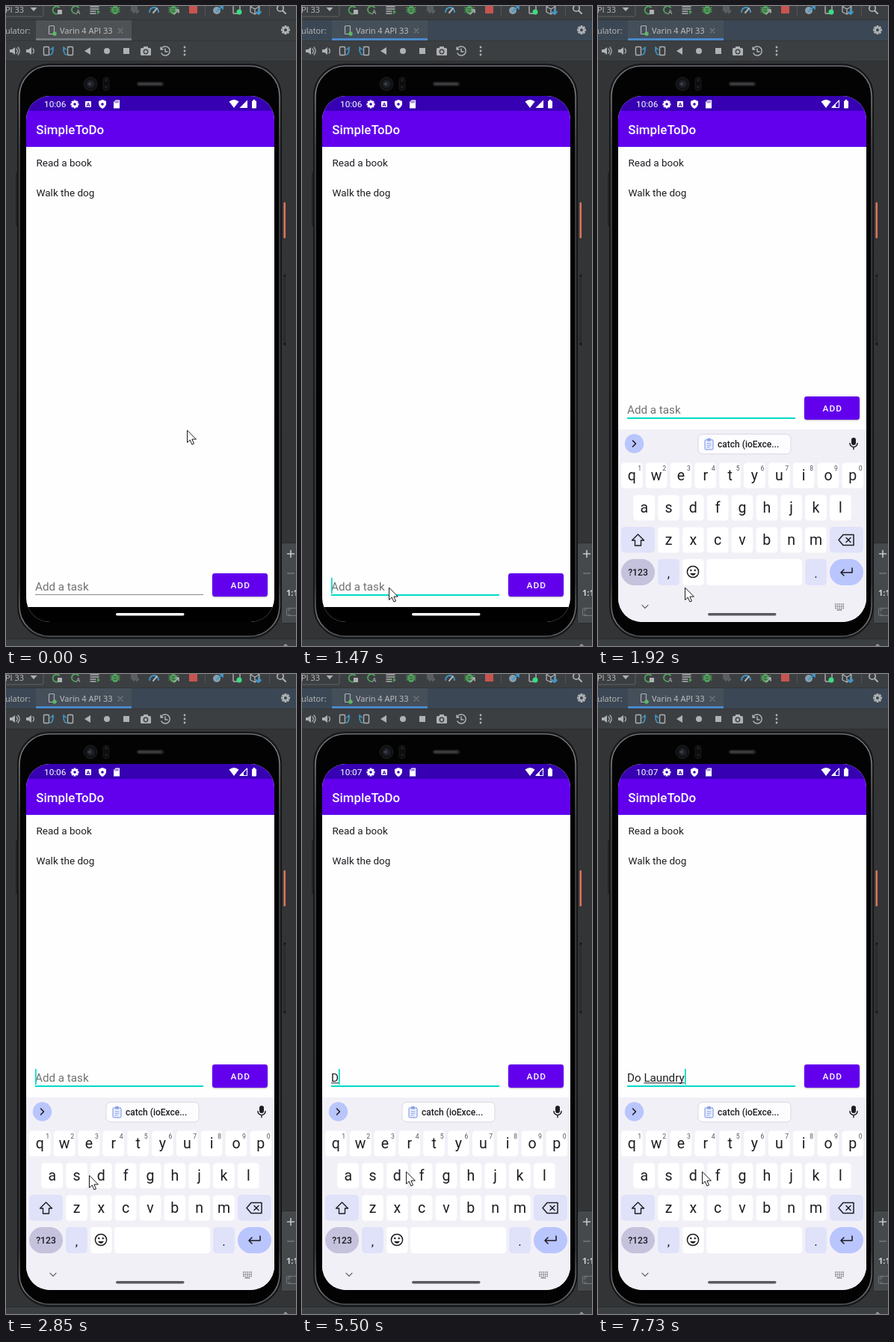
These frames come from a looping animation (388 by 854 pixels, 8 s). An HTML page with a canvas:

```html
<!DOCTYPE html>
<html lang="en">
<head>
<meta charset="utf-8">
<title>To-do app in an emulator</title>
<style>
html, body { margin: 0; width: 100%; height: 100%; overflow: hidden; background: #323436; }
canvas { display: block; width: 388px; height: 854px; }
</style>
</head>
<body>
<canvas id="stage"></canvas>
<script>
const W = 388, H = 854, LOOP = 8000;
const canvas = document.getElementById('stage');
const c = canvas.getContext('2d');
const dpr = window.devicePixelRatio || 1;
canvas.width = W * dpr;
canvas.height = H * dpr;

const UI = '"Open Sans", sans-serif', APP = 'Roboto, sans-serif';
const GREY = '#afb1b3', GREEN = '#4fa35a', BLUE = '#3f97c9', INK = '#1d1d22', TEAL = '#03dac5';

// Held states: [start, ...values]
const pointer = [
  [0, 242, 566], [410, 257, 529], [545, 261, 513], [680, 246, 590], [815, 203, 676],
  [950, 150, 750], [1085, 112, 779], [1220, 116, 776], [2310, 128, 784], [2430, 140, 792],
  [2550, 150, 764], [2700, 128, 700], [2850, 111, 669], [3000, 120, 662], [3130, 132, 661], [3270, 139, 664]
];
const typing = [
  [0, '', ''], [5500, '', 'D'], [5930, '', 'Do'], [6210, 'Do ', ''], [6480, 'Do ', 'L'],
  [6630, 'Do ', 'La'], [6780, 'Do ', 'Lau'], [7060, 'Do ', 'Laun'], [7320, 'Do ', 'Laund'],
  [7450, 'Do ', 'Laundr'], [7730, 'Do ', 'Laundry']
];
const blink = [[0, 0], [1470, 1], [1920, 0], [2430, 1], [3000, 0], [3420, 1], [3950, 0], [4380, 1], [4910, 0], [5500, 1]];
const held = (list, t) => list.filter(s => s[0] <= t).pop().slice(1);

function box(x, y, w, h, fill, r = 0, stroke, lw = 1) {
  c.beginPath();
  c.roundRect(x, y, w, h, r);
  if (fill) { c.fillStyle = fill; c.fill(); }
  if (stroke) { c.strokeStyle = stroke; c.lineWidth = lw; c.stroke(); }
}
function dot(x, y, r, fill, stroke, lw = 1) {
  box(x - r, y - r, 2 * r, 2 * r, fill, r, stroke, lw);
}
function text(s, x, y, size, color, font = APP, weight = 400, align = 'left') {
  c.font = `${weight} ${size}px ${font}`;
  c.textAlign = align;
  c.fillStyle = color;
  c.fillText(s, x, y);
}
function shape(d, x, y, fill, stroke, lw = 1.3) {
  const p = new Path2D(d);
  c.save();
  c.translate(x, y);
  if (fill) { c.fillStyle = fill; c.fill(p); }
  if (stroke) {
    c.strokeStyle = stroke;
    c.lineWidth = lw;
    c.lineCap = c.lineJoin = 'round';
    c.stroke(p);
  }
  c.restore();
}
function gear(x, y, r, color, hole) {
  c.save();
  c.translate(x, y);
  for (let i = 0; i < 4; i++) {
    box(-r * .25, -r, r * .5, 2 * r, color);
    c.rotate(Math.PI / 4);
  }
  c.restore();
  dot(x, y, r * .72, color);
  dot(x, y, r * .33, hole);
}
function bug(x, y) {
  shape('M-6 -3L6 3M-6 3L6 -3M-6 0H6', x, y, null, GREEN, 1.3);
  box(x - 4, y - 5, 8, 11, GREEN, 4);
  shape('M-2 -1H2M-2 2H2', x, y, null, '#3c3f41', 1);
}

function toolbar(focused) {
  const header = focused ? '#3b4754' : '#3c3f41';
  box(0, 0, W, 74, '#3c3f41');
  box(-10, -10, 60, 24, null, 2, '#5f6264');
  text('PI 33', -1, 9, 11, '#bbbbbb', UI);
  shape('M-4.5 -2H4.5L0 3Z', 37, 4, GREY);
  shape('M4 -3A5 5 0 1 0 5 3', 67, 5, null, GREEN, 1.8);
  box(69, 5, 6, 6, GREY);
  shape('M4 -3A5 5 0 1 0 0 5', 93, 5, null, GREEN, 1.8);
  text('A', 94, 11, 8, GREY, UI, 600);
  shape('M-6 -4H5M-6 -1H5M-6 2H1M-6 5H1', 119, 5, null, GREY, 1.5);
  shape('M3 2V8L7 5Z', 119, 3, GREEN);
  bug(146, 5);
  shape('M-5 -5H4V3L-1 7L-5 3ZM2 0L7 4L2 8Z', 172, 3, '#5b5e60');
  shape('M-6 4A6 6 0 0 1 6 4', 198, 4, null, BLUE, 2);
  shape('M-1 5L4 -1', 198, 4, null, GREY, 2);
  bug(224, 5);
  shape('M0 6L6 0M2 0H6V4', 225, 5, null, GREY, 1.5);
  box(245, 0, 11, 10, '#c75450');
  box(266, 0, 1, 13, '#515456');
  dot(282, 6, 5, '#87a0ad');
  shape('M-2 3L6 -4M2 -4H6V0', 284, 4, null, BLUE, 1.8);
  box(304, -6, 9, 16, null, 1, GREY, 1.4);
  dot(312, 8, 3.5, '#3ddc84');
  shape('M-6 -3L0 -6L6 -3V4L0 7L-6 4ZM-6 -3L0 0L6 -3M0 0V7', 333, 4, null, GREY, 1.3);
  shape('M3 1V8M0 5L3 8L6 5', 335, 3, null, BLUE, 2);
  box(352, 0, 1, 13, '#515456');
  dot(367, 3, 4.2, null, GREY, 1.7);
  shape('M3 3L7 7', 367, 3, null, GREY, 2);
  box(0, 18, W, 1, '#323537');

  box(0, 19, W, 27, header);
  box(40, 19, 128, 27, focused ? '#454f5a' : '#4e5254');
  box(40, 43, 128, 3, focused ? '#4a88c7' : '#747a80');
  text('ulator:', -1, 37, 11, '#bbbbbb', UI);
  box(57.5, 26.5, 7, 11, null, 1, GREY, 1.2);
  dot(65, 37, 2.7, '#5fb865');
  text('Varin 4 API 33', 72, 37, 11, '#c4c4c4', UI);
  shape('M-3 -3L3 3M3 -3L-3 3', 153, 33, null, '#777b7e', 1.1);
  gear(374, 32, 6, GREY, header);
  box(0, 46, W, 1, '#323537');

  for (const x of [11, 33]) shape('M-6 -2H-3L1 -5V5L-3 2H-6Z', x, 60, GREY);
  shape('M3 -3A4 4 0 0 1 3 3M5 -5A7 7 0 0 1 5 5', 11, 60, null, GREY, 1.3);
  shape('M3 -3A4 4 0 0 1 3 3', 33, 60, null, GREY, 1.3);
  for (const [x, k] of [[57, 1], [83, -1]]) {
    box(x - 3.5 - 3 * k, 54.5, 7, 11, null, 1, GREY, 1.4);
    shape(`M${2 * k} 5Q${6 * k} 5 ${6 * k} -4M${3 * k} -2L${6 * k} -5`, x, 60, null, BLUE, 1.7);
  }
  shape('M4 -5V5L-4 0Z', 109, 60, GREY);
  dot(135, 60, 4, GREY);
  box(157, 56, 8, 8, GREY);
  box(180, 56, 14, 10, GREY, 1.5);
  box(184, 54, 6, 3, GREY);
  dot(187, 61, 2.7, null, '#3c3f41', 1.4);
  shape('M-5 -3A6 6 0 1 1 -5 3M-6 -5V-2H-3M0 -3V1H3', 213, 60, null, GREY, 1.5);
  for (const y of [55, 60, 65]) dot(239, y, 1.4, GREY);
  box(0, 73, W, 1, '#2b2d2f');
}

function surround() {
  box(0, 0, W, H, '#323436');
  box(0, 845, W, 9, '#3c3f41');
  box(0, 844, W, 1, '#292b2d');
  shape('M-3 3L0 0L3 3', 374, 852, null, GREY);
  box(368.5, 716.5, 30, 107, '#45494c', 2, '#2a2c2e');
  shape('M-4.5 0H4.5M0 -4.5V4.5', 381, 731, null, '#c3c5c7', 1.6);
  shape('M-4.5 0H4.5', 381, 757, null, '#75787a', 1.3);
  text('1:1', 375, 787, 11, '#d0d2d4', UI, 700);
  box(375.5, 803.5, 14, 10, null, 1, '#75787a');
  shape('M0 3V0H3M0 6V8H3', 378, 805, null, '#75787a', 1);
}

function phone() {
  box(13, 222, 3, 72, '#222426', 1);
  box(371.5, 262, 2.5, 48, '#e0745c', 1);
  box(371, 358, 3, 95, '#292b2d', 1);
  dot(373, 360, 1.3, '#111');
  dot(373, 451, 1.3, '#111');

  // Metal edge, brightest round the corners
  const shine = c.createLinearGradient(0, 78, 0, 843);
  shine.addColorStop(0, '#6a6d70');
  shine.addColorStop(.05, '#85888a');
  shine.addColorStop(.15, '#4a4d50');
  shine.addColorStop(.9, '#3c3f42');
  shine.addColorStop(.97, '#7b7e80');
  shine.addColorStop(1, '#505356');
  box(15.5, 77.5, 353, 766, '#1c1d20', 42, '#111214');
  box(18, 80, 348, 761, '#030303', 40, shine, 1.4);

  dot(113, 104, 9, '#111214', '#1c1d20');
  dot(113, 104, 5, '#20222a');
  dot(112, 104, 1.8, '#454955');
  box(130, 95, 8, 18, '#0d0d0f', 4, '#19191c');
  dot(134, 99, 2, '#1d1d20');
  dot(134, 108, 2, '#1d1d20');
  box(175, 101, 36, 6, '#222225', 3);
  c.setLineDash([1, 1]);
  shape('M178 104H208', 0, 0, null, '#454548', 2);
  c.setLineDash([]);
}

function statusBar(t) {
  box(27, 120, 332, 20, '#3700b3');
  text(t < 4070 ? '10:06' : '10:07', 51, 135.3, 11.8, '#fff');
  gear(92, 131, 5.5, '#fff', '#3700b3');
  box(106, 127, 8, 8, '#fff', 1);
  text('A', 110, 133.7, 7.5, '#3700b3', APP, 700, 'center');
  shape('M0 -6L5 -4V0Q4 4 0 6Q-4 4 -5 0V-4Z', 129, 131, '#fff');
  dot(129, 131, 1.8, '#3700b3');
  shape('M-1.5 -5.5H4V5.5H-4V-3Z', 148, 131, '#fff');
  shape('M-2 -4V-2M0 -4V-2M2 -4V-2', 148, 131, null, '#3700b3', .9);
  shape('M-6.5 -3Q0 -8 6.5 -3L0 5.5Z', 305, 130.5, '#fff');
  if (t < 1620) {
    shape('M5 -5.5V5H-5.5Z', 318, 131, '#fff');
  } else {
    shape('M4.5 -5V4.5H-5Z', 318, 131, null, '#fff', 1.1);
    shape('M0 0V4.5H-5Z', 318, 131, '#fff');
  }
  box(329, 126.5, 6, 10, '#fff', 1);
  box(330.7, 125, 2.6, 2, '#fff');
}

function inputRow(t, focused, lifted) {
  const y = lifted ? -236 : 0;
  const [done, word] = held(typing, t);
  let end = 39;
  if (done || word) {
    text(done + word, 39, 779.5 + y, 15.2, INK);
    const start = 39 + c.measureText(done).width;
    end = 39 + c.measureText(done + word).width;
    if (word) box(start, 781.3 + y, end - start, 1, INK);
  } else {
    text('Add a task', 39, 779.5 + y, 15.2, '#717171');
  }
  if (focused) box(39, 785 + y, 225, 2, TEAL);
  else box(39, 785, 225, 1, '#8a8a8a');
  if (held(blink, t)[0]) box(Math.round(end), 763 + y, 1.7, 21, TEAL);

  c.save();
  c.shadowColor = 'rgba(0,0,0,.3)';
  c.shadowBlur = 2 * dpr;
  c.shadowOffsetY = dpr;
  box(276, 757 + y, 74, 31, '#6200ee', 3.4);
  c.restore();
  c.letterSpacing = '1.05px';
  text('ADD', 313.7, 777 + y, 11.8, '#fff', APP, 500, 'center');
  c.letterSpacing = '0px';
}

function keyRow(letters, x, y) {
  [...letters].forEach((ch, i) => {
    const mid = x + i * 32.83;
    box(mid - 14.3, y, 28.6, 34, '#fff', 4.5);
    text(ch, mid, y + 23.3, 19.5, INK, APP, 400, 'center');
    if (letters.length === 10) text((i + 1) % 10, mid + 10.5, y + 10, 8.7, '#55555c', APP, 400, 'center');
  });
}

function keyboard(dy, chip) {
  const mod = '#dfe2f9', accent = '#b9c5fd';
  c.save();
  c.translate(0, dy);
  box(27, 565, 332, 260, '#f2f0f7');
  dot(48.5, 584, 12.7, accent);
  shape('M-2 -4L2 0L-2 4', 48.5, 584, null, INK, 1.6);

  c.save();
  c.translate(196, 584.3);
  c.scale(chip, chip);
  c.globalAlpha = chip < 1 ? .75 : 1;
  box(-62, -13, 124, 26.5, '#fdfcff', 6, '#d9d8e2');
  box(-53, -5.5, 11, 13, '#e8edff', 1.5, '#8fa5e8', 1.2);
  box(-50, -7.5, 5, 4, '#8fa5e8', 1);
  shape('M-50 -.5H-45M-50 2H-45M-50 4.5H-47', 0, 0, null, '#8fa5e8', 1);
  text('catch (ioExce...', -36, 4.7, 12, INK, APP, 500);
  c.restore();

  box(339, 576, 6, 10, INK, 3);
  shape('M-5 0A5 5 0 0 0 5 0M0 5V8', 342, 583.5, null, INK, 1.5);

  keyRow('qwertyuiop', 45.3, 609.5);
  keyRow('asdfghjkl', 61.7, 652.5);
  keyRow('zxcvbnm', 94.5, 695.5);
  box(31, 695, 45, 34.5, mod, 5);
  shape('M0 -8L8 0H4V7H-4V0H-8Z', 53.5, 713, null, INK, 1.4);
  box(310, 695, 45, 34.5, mod, 5);
  shape('M-10 0L-4 -7H10V7H-4ZM0 -3L6 3M6 -3L0 3', 332, 712.5, null, INK, 1.5);

  box(31, 738, 45, 35, '#c4c2dc', 17.5);
  text('?123', 53.5, 760, 12.2, INK, APP, 500, 'center');
  box(80.2, 738, 28.6, 35, mod, 4.5);
  text(',', 94.5, 763, 17, INK, APP, 400, 'center');
  box(113, 738, 28.6, 35, '#fff', 4.5);
  dot(127, 755, 7.6, null, INK, 1.5);
  dot(124.3, 753, 1.2, INK);
  dot(129.7, 753, 1.2, INK);
  shape('M-4 2Q0 8 4 2Z', 127, 755, INK);
  box(145, 738, 128, 35, '#fff', 4.5);
  box(277.3, 738, 28.6, 35, mod, 4.5);
  text('.', 291.5, 763, 17, INK, APP, 400, 'center');
  box(310, 738, 45, 35, accent, 17.5);
  shape('M8 -5V1H-7M-3 -3L-7 1L-3 5', 332, 755, null, INK, 1.6);

  shape('M-4 -2L0 2L4 -2', 63, 801.5, null, '#6c6b72', 1.2);
  for (let i = 0; i < 15; i++) box(317 + i % 5 * 2.6, 797.5 + Math.floor(i / 5) * 2.6, 1.6, 1.6, '#77767d');
  box(319.5, 805.3, 7, 1.3, '#77767d');
  c.restore();
}

function screen(t) {
  const focused = t >= 1470, lifted = t >= 1620, settled = t >= 1770;
  c.save();
  c.beginPath();
  c.roundRect(27, 120, 332, 702, 32);
  c.clip();
  box(27, 120, 332, 702, '#fefefe');
  statusBar(t);
  box(27, 140, 332, 48, '#6200ee');
  text('SimpleToDo', 40.3, 171, 16.9, '#fff', APP, 500);
  text('Read a book', 40.5, 213.5, 13.5, INK);
  text('Walk the dog', 40.5, 254, 13.5, INK);
  inputRow(t, focused, lifted);
  if (lifted) keyboard(settled ? 0 : 60, settled ? 1 : .81);
  if (!settled) box(27, 802, 332, 20, lifted ? 'rgba(0,0,0,.2)' : '#000');
  box(147, 810, 91.5, 3.6, settled ? '#5b5a61' : '#fdfdfd', 1.8);
  c.restore();
}

function arrow(x, y) {
  shape('M0 0V16L3.8 12.6L6.4 18.6L9 17.5L6.4 11.6H11.5Z', x + .5, y + .5, '#fff', '#1b1b1b', 1);
}

function draw(now) {
  const t = now % LOOP;
  c.setTransform(dpr, 0, 0, dpr, 0, 0);
  surround();
  toolbar(t >= 1470);
  phone();
  screen(t);
  arrow(...held(pointer, t));
}

const began = performance.now();
function tick() {
  draw(performance.now() - began);
  requestAnimationFrame(tick);
}
tick();
</script>
</body>
</html>
```
